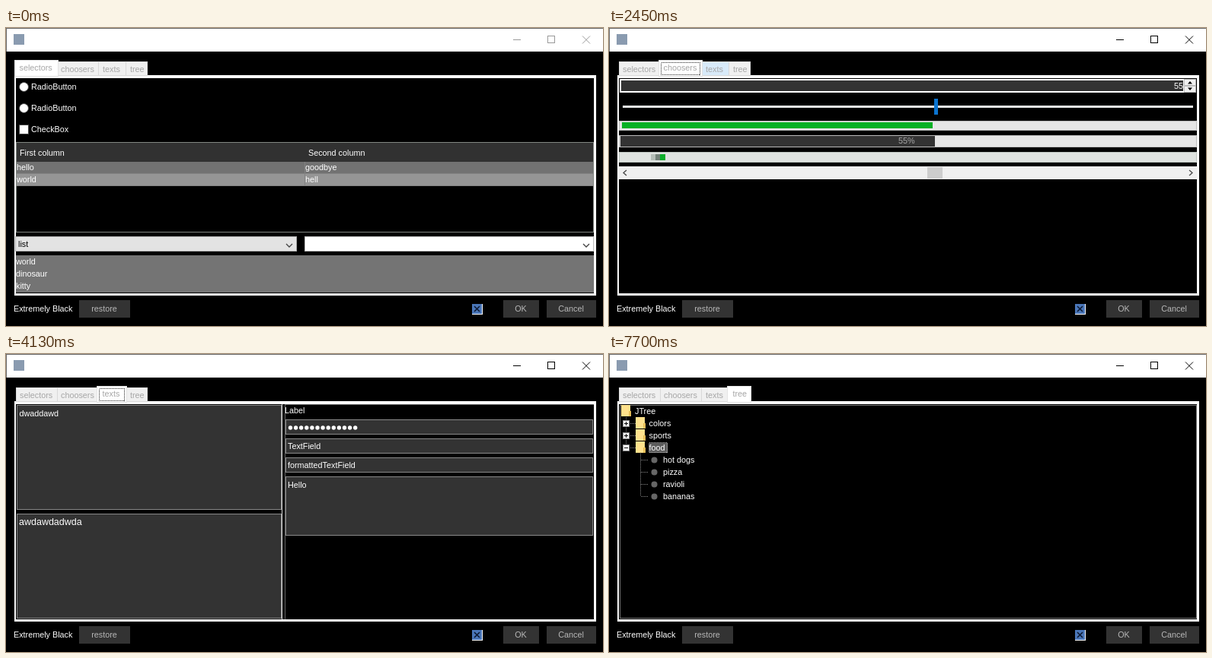
Animation, 784 px wide and 392 px high, one loop 9100 ms. Source, as an HTML page:

```html
<!DOCTYPE html>
<html lang="en">
<head>
<meta charset="utf-8">
<title>Extremely Black</title>
<style>
  html, body { margin: 0; width: 100%; height: 100%; overflow: hidden; background: #000; }
  svg { display: block; width: 100vw; height: 100vh; shape-rendering: crispEdges; }
  text { font: 10.8px "Liberation Sans", Arial, sans-serif; fill: #fff; white-space: pre; }
  .round { shape-rendering: geometricPrecision; }
  .dark { fill: #333; }
  .field { fill: #333; stroke: #8a8a8a; }
  .light { fill: #e6e6e6; stroke: #bcbcbc; }
  .tab { fill: #f0f0f0; stroke: #d9d9d9; }
  .tab.hover { fill: #d8eaf9; }
  .tab.open { fill: #fff; stroke: #e4e4e4; }
  .tabs text { fill: #a6a6a6; }
  .button text { fill: #b8b8b8; text-anchor: middle; }
  .dots { fill: none; stroke: #888; stroke-dasharray: 1 1; }
  .ring { fill: none; stroke: #222; stroke-dasharray: 1 1; }
  .chosen { fill: #5c5c5c; stroke: #bbb; stroke-dasharray: 1 1; }
  .chevron { fill: none; stroke: #444; stroke-width: 1.3; }
  .caption { fill: none; stroke: #000; }
  .caption.idle { stroke: #999; }
</style>
</head>
<body>
<svg viewBox="0 0 784 392" xmlns="http://www.w3.org/2000/svg">
  <!-- window -->
  <rect width="784" height="392"/>
  <rect width="784" height="31" fill="#fff"/>
  <path d="M0 .5H784M.5 0V31" stroke="#666"/>
  <rect x="10" y="8" width="14" height="14" fill="#8a9bb0"/>
  <path id="caption" class="caption" d="M666 15.5h10M711.5 10.5h9v9h-9z"/>
  <path id="cross" class="caption round" d="M757 10.5l10 10m0-10l-10 10"/>

  <!-- tab pane -->
  <rect x="11" y="62" width="764" height="290" fill="#fafafa"/>
  <rect x="13" y="66" width="759" height="283"/>
  <g id="tabs" class="tabs"></g>

  <!-- footer -->
  <text x="10" y="373">Extremely Black</text>
  <g class="button">
    <rect class="dark" x="96" y="358" width="67" height="23"/><text x="129" y="373">restore</text>
    <rect class="dark" x="653" y="358" width="47" height="23"/><text x="676" y="373">OK</text>
    <rect class="dark" x="710" y="358" width="65" height="23"/><text x="742" y="373">Cancel</text>
  </g>
  <rect x="612" y="363" width="14" height="14" fill="#fff"/>
  <rect x="612" y="363" width="13" height="13" fill="#4a76b8"/>
  <path class="round" d="M615 366l7 7m0-7l-7 7" stroke="#0d1a33" stroke-width="1.6"/>

  <!-- selectors -->
  <g data-on="0-1680">
    <g class="round" fill="#fff" stroke="#444"><circle cx="23.5" cy="77.5" r="6"/><circle cx="23.5" cy="105.5" r="6"/></g>
    <rect x="17.5" y="127.5" width="12" height="12" fill="#fff" stroke="#444"/>
    <text x="33" y="81">RadioButton</text>
    <text x="33" y="109">RadioButton</text>
    <text x="33" y="137">CheckBox</text>
    <rect x="13.5" y="150.5" width="758" height="118" stroke="#828782"/>
    <rect x="14" y="151" width="757" height="25" fill="#313131"/>
    <rect x="14" y="176" width="757" height="16" fill="#727272"/>
    <rect x="14" y="192" width="757" height="16" fill="#959595"/>
    <path d="M392.5 176v32M14 191.5h757M14 207.5h757" stroke="#828282"/>
    <text x="18" y="168">First column</text><text x="397" y="168">Second column</text>
    <text x="14" y="187">hello</text><text x="393" y="187">goodbye</text>
    <text x="14" y="203">world</text><text x="393" y="203">hell</text>
    <rect x="12.5" y="274.5" width="369" height="19" fill="#e3e3e3" stroke="#adadad"/>
    <rect x="392.5" y="274.5" width="379" height="19" fill="#fff" stroke="#bbb"/>
    <path class="chevron round" d="M368 284l4 4 4-4M758 284l4 4 4-4"/>
    <text x="16" y="288" style="fill:#000">list</text>
    <rect x="13" y="299" width="759" height="49" fill="#747474"/>
    <text x="13" y="311">world</text><text x="13" y="327">dinosaur</text><text x="13" y="343">kitty</text>
  </g>

  <!-- choosers -->
  <g data-on="1680-4130">
    <rect x="14" y="67" width="757" height="18" fill="#fff"/>
    <rect class="dark" x="16" y="69" width="738" height="14"/>
    <text id="count" x="754" y="80" text-anchor="end"></text>
    <path d="M755.5 67.5h15v8h-15zM755.5 76.5h15v8h-15z" fill="#f0f0f0" stroke="#bbb"/>
    <path class="round" d="M760 73.5l3-3.5 3 3.5zM760 78.5l3 3.5 3-3.5z"/>
    <rect x="18" y="102" width="749" height="3" fill="#e7eaea"/>
    <rect id="knob" y="93" width="5" height="21" fill="#0b74d0"/>
    <rect class="light" x="13.5" y="122.5" width="758" height="12"/>
    <rect id="green" x="17" y="124" height="8" fill="#06b025"/>
    <rect class="light" x="13.5" y="141.5" width="758" height="15"/>
    <rect id="fill" class="dark" x="15" y="142" height="14"/>
    <text id="percent" x="380" y="152"></text>
    <rect x="13.5" y="163.5" width="758" height="13" fill="#dfe3e0" stroke="#bcc4be"/>
    <svg x="13" y="163" width="759" height="14"><g id="runner">
      <rect y="3" width="6" height="8" fill="#b4bdb6"/>
      <rect x="6" y="3" width="6" height="8" fill="#748279"/>
      <rect x="12" y="3" width="7" height="8" fill="#0cae2b"/>
    </g></svg>
    <rect x="13" y="182" width="759" height="17" fill="#f0f0f0"/>
    <path class="chevron round" d="M23 187l-4 3.5 4 3.5M762 187l4 3.5-4 3.5"/>
    <rect id="thumb" y="183" width="20" height="15"/>
  </g>

  <!-- texts -->
  <g data-on="4130-6160">
    <rect class="field" x="14.5" y="67.5" width="347" height="137"/>
    <rect class="field" x="14.5" y="210.5" width="347" height="137"/>
    <path d="M362.5 66v283" stroke="#ddd"/>
    <path d="M366.5 66v283M366 66.5h406" stroke="#666"/>
    <rect class="field" x="367.5" y="86.5" width="403" height="19"/>
    <rect class="field" x="367.5" y="111.5" width="403" height="19"/>
    <rect class="field" x="367.5" y="136.5" width="403" height="19"/>
    <rect class="field" x="367.5" y="161.5" width="403" height="77"/>
    <rect id="marked" y="71" height="14" fill="#a0a0a0"/>
    <text x="17.5" y="82">dwaddawd</text>
    <text x="17" y="225" style="font-size:12.5px">awdawdadwda</text>
    <text x="366" y="78">Label</text>
    <path class="round" d="M373.5 97h86" stroke="#fff" stroke-width="5.4" stroke-linecap="round" stroke-dasharray="0 7.1"/>
    <text x="370" y="125">TextField</text>
    <text x="370" y="150">formattedTextField</text>
    <text x="370" y="176">Hello</text>
    <path data-on="5040-5180" d="M70.5 71v14" stroke="#fff"/>
    <path data-on="5320-5670 6020-6160" d="M17.5 71v14" stroke="#fff"/>
  </g>

  <!-- tree -->
  <g data-on="6160-9100">
    <rect x="14.5" y="67.5" width="757" height="280" stroke="#777"/>
    <path class="dots" d="M22.5 83v40M28 91.5h7M28 107.5h7M28 123.5h7"/>
    <rect data-on="6160-7140" class="chosen" x="52.5" y="84.5" width="30" height="13"/>
    <rect data-on="7140-7700" class="chosen" x="52.5" y="100.5" width="32" height="13"/>
    <rect data-on="7700-9100" class="chosen" x="52.5" y="116.5" width="24" height="13"/>
    <g id="branches"></g>
    <g data-on="7700-9100">
      <path class="dots" d="M41.5 131v56M42 139.5h10M42 155.5h10M42 171.5h10M42 187.5h10"/>
      <g id="leaves"></g>
    </g>
  </g>
</svg>
<script>
const LOOP = 9100, STEP = 70;
const $ = id => document.getElementById(id);
const box = (cls, x, y, w, h, on = '') =>
  `<rect class="${cls}" x="${x + .5}" y="${y + .5}" width="${w - 1}" height="${h - 1}" ${on && `data-on="${on}"`}/>`;
const label = (x, y, s) => `<text x="${x}" y="${y}">${s}</text>`;

const tabs = [
  { name: 'selectors', x: 13, w: 55, tx: 18, open: '0-1680' },
  { name: 'choosers', x: 67, w: 55, tx: 72, open: '1680-4130', hover: '1190-1680', focus: '1680-4130' },
  { name: 'texts', x: 121, w: 37, tx: 127, open: '4130-6160', hover: '1050-1190 2450-2590 3920-4130', focus: '4130-5040' },
  { name: 'tree', x: 157, w: 29, tx: 163, open: '6160-9100', hover: '5880-6160' }
];
const closedTab = t => box('tab', t.x, 44, t.w, 19)
  + (t.hover ? box('tab hover', t.x, 44, t.w, 19, t.hover) : '') + label(t.tx, 58, t.name);
const openTab = t => `<g data-on="${t.open}">${box('tab open', t.x - 2, 42, t.w + 3, 22)}`
  + (t.focus ? box('ring', t.x + 1, 45, t.w - 3, 17, t.focus) : '') + label(t.tx - .5, 56, t.name) + '</g>';
$('tabs').innerHTML = tabs.map(closedTab).join('') + tabs.map(openTab).join('');

const folder = (x, y) => `<path fill="#ffe18c" d="M${x} ${y}h12v15h-12z"/><path fill="#e8bf58" d="M${x + 10} ${y + 8}h3v7h-3z"/>`;
const expander = (y, plusOn) => `<rect x="18.5" y="${y + 4.5}" width="8" height="8" fill="#fff" stroke="#888"/>
  <path d="M20 ${y + 8.5}h5" stroke="#000"/><path data-on="${plusOn}" d="M22.5 ${y + 6}v5" stroke="#000"/>`;
$('branches').innerHTML = folder(16, 67) + label(34, 79, 'JTree')
  + ['colors', 'sports', 'food'].map((name, i) => {
    const y = 83 + 16 * i;
    return folder(35, y) + expander(y, i < 2 ? '0-9100' : '0-7700') + label(52.5, y + 12, name);
  }).join('');
$('leaves').innerHTML = ['hot dogs', 'pizza', 'ravioli', 'bananas'].map((name, i) =>
  `<circle class="round" cx="59.5" cy="${139.5 + 16 * i}" r="4" fill="#666"/>` + label(71, 143 + 16 * i, name)).join('');

const timed = [...document.querySelectorAll('[data-on]')].map(el => ({
  el, spans: el.dataset.on.split(' ').map(s => s.split('-').map(Number))
}));
const within = (t, a, b) => t >= a && t < b;
const ramp = (t, a, b) => Math.min(1, Math.max(0, (t - a) / (b - a)));
const set = (id, attr, value) => $(id).setAttribute(attr, value);

function drawChoosers(t) {
  const value = Math.round(55 - 12 * ramp(t, 2940, 3360));
  $('count').textContent = value;
  $('percent').textContent = value + '%';
  $('percent').style.fill = value >= 50 ? '#aaa' : '#333';
  set('knob', 'x', Math.round(14.5 + 7.5 * value));
  set('green', 'width', 7.5 * value - 4.5);
  set('fill', 'width', Math.round(7.52 * value - .5));
  set('thumb', 'x', Math.round(15 + 7.33 * value));
  set('thumb', 'fill', within(t, 2870, 3570) ? '#606060' : '#cdcdcd');
  // The runner pauses briefly before its long pass.
  const x = t < 2450 ? 30 + .7 * (Math.min(t, 2310) - 2310) : 55 + .7 * (t - 2450);
  set('runner', 'transform', `translate(${Math.round((x - 13 + 759) % 759)} 0)`);
}

function draw(now) {
  const t = Math.floor(now % LOOP / STEP) * STEP;
  for (const { el, spans } of timed)
    el.style.display = spans.some(([a, b]) => within(t, a, b)) ? '' : 'none';
  for (const id of ['caption', 'cross']) $(id).classList.toggle('idle', t < 1610);
  drawChoosers(t);
  const left = Math.round(70 - 52 * ramp(t, 5110, 5320));
  set('marked', 'x', left);
  set('marked', 'width', 70 - left);
  requestAnimationFrame(draw);
}
draw(performance.now());
</script>
</body>
</html>
```
